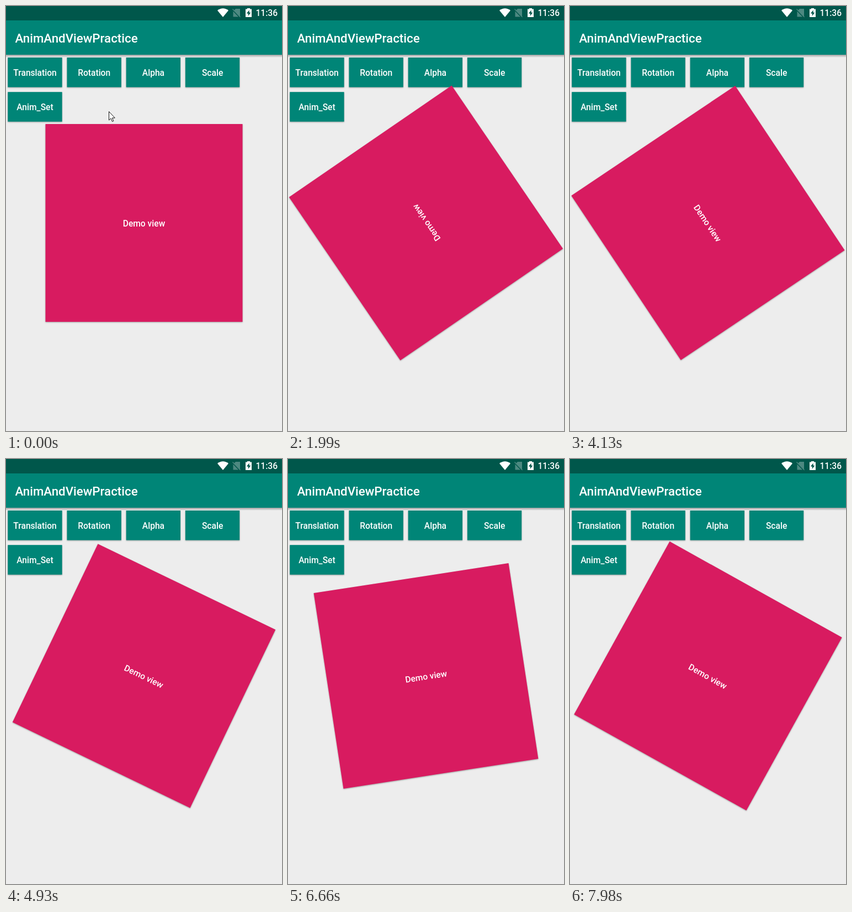
Write an HTML page that moves like this. It is 500x767 px and loops after 8 s.

```html
<!DOCTYPE html>
<html lang="en">
<head>
<meta charset="utf-8">
<title>Rotation demo</title>
<style>
  html, body { margin: 0; width: 100%; height: 100%; overflow: hidden; background: #ededed; }
  svg { display: block; width: 100vw; height: 100vh; }
  text { font: 500 15.6px Roboto, sans-serif; fill: #fff; }
  .mid { text-anchor: middle; }
  .title { font-size: 22.3px; }
  .raised { filter: drop-shadow(0 1px 1px rgba(0, 0, 0, .32)); }
</style>
</head>
<body>
<svg viewBox="0 0 500 767">
  <defs>
    <linearGradient id="shade" x2="0" y2="1">
      <stop offset="0" stop-color="#000" stop-opacity=".32"/>
      <stop offset="1" stop-color="#000" stop-opacity="0"/>
    </linearGradient>
  </defs>
  <rect width="500" height="767" fill="#ededed"/>
  <rect y="88" width="500" height="5" fill="url(#shade)"/>
  <rect y="26" width="500" height="62" fill="#008577"/>
  <rect width="500" height="26" fill="#00574b"/>

  <path d="M383 8Q393 .5 403 8L393 20Z" fill="#fff"/>
  <g>
    <path d="M416 5H424V19.5H411.5V9.5Z" fill="#4d8981"/>
    <path d="M411 7.5L424 21" stroke="#00574b" stroke-width="2.2"/>
    <path d="M410.5 5.5L424.5 20" stroke="#4d8981" stroke-width="1.4"/>
  </g>
  <path d="M437 4H442V5.5H445V20H434V5.5H437Z" fill="#fff"/>
  <path d="M440.6 7.5L435.8 13.6H438.8V18L443.3 11.7H440.6Z" fill="#00574b"/>
  <text x="452.5" y="18">11:36</text>
  <text class="title" x="16.5" y="66">AnimAndViewPractice</text>

  <g id="buttons"></g>
  <rect id="press" x="110.5" y="93" width="98.3" height="53.5" opacity="0"/>
  <g class="raised">
    <g id="view">
      <rect x="71.5" y="213" width="357" height="357" fill="#d81b60"/>
      <text class="mid" x="250" y="398">Demo view</text>
    </g>
  </g>
  <path id="cursor" d="M.5 .5V16L4 12.8L6.5 18.5L8.8 17.5L6.4 12H11.3Z" fill="#fff" stroke="#111" stroke-width="1"/>
</svg>
<script>
const LOOP = 8000, STEP = 57.7, START = 938;
// Turns of the back-and-forth animator at a few ticks after the tap
const PHASES = [[0, .042], [18, .6], [36, 1.15], [55, 1.7413], [81, 2.5414], [99, 3.0993], [122, 3.8167]];
const $ = id => document.getElementById(id);
const clamp = v => Math.min(1, Math.max(0, v));
const ease = x => (1 - Math.cos(Math.PI * x)) / 2;

$('buttons').innerHTML = ['Translation', 'Rotation', 'Alpha', 'Scale', 'Anim_Set'].map((label, i) => {
  const x = 3.3 + i % 4 * 107.2, y = i < 4 ? 93 : 155.2;
  return `<rect class="raised" x="${x}" y="${y}" width="98.3" height="53.5" fill="#008577"/>
    <text class="mid" x="${x + 49.2}" y="${y + 33}">${label}</text>`;
}).join('');

function phaseAt(tick) {
  const i = Math.max(1, PHASES.findIndex(p => p[0] >= tick));
  const [a, b] = [PHASES[i - 1], PHASES[i]];
  return a[1] + (b[1] - a[1]) * (tick - a[0]) / (b[0] - a[0]);
}

function draw(t) {
  const tick = Math.min(122, Math.floor((t - START) / STEP));
  const angle = tick < 0 ? 0 : 360 * ease(phaseAt(tick));
  $('view').setAttribute('transform', `rotate(${angle} 250 391.5)`);

  const move = ease(clamp((tick + 17) / 9));
  $('cursor').setAttribute('transform', `translate(${186 - 27 * move} ${190 - 76 * move})`);
  $('cursor').setAttribute('visibility', tick < 6 ? 'visible' : 'hidden');
  $('press').setAttribute('opacity', tick < 0 ? 0 : .12 * clamp(1 - tick / 8));
}

function loop(now) {
  draw(now % LOOP);
  requestAnimationFrame(loop);
}
draw(0);
requestAnimationFrame(loop);
</script>
</body>
</html>
```
